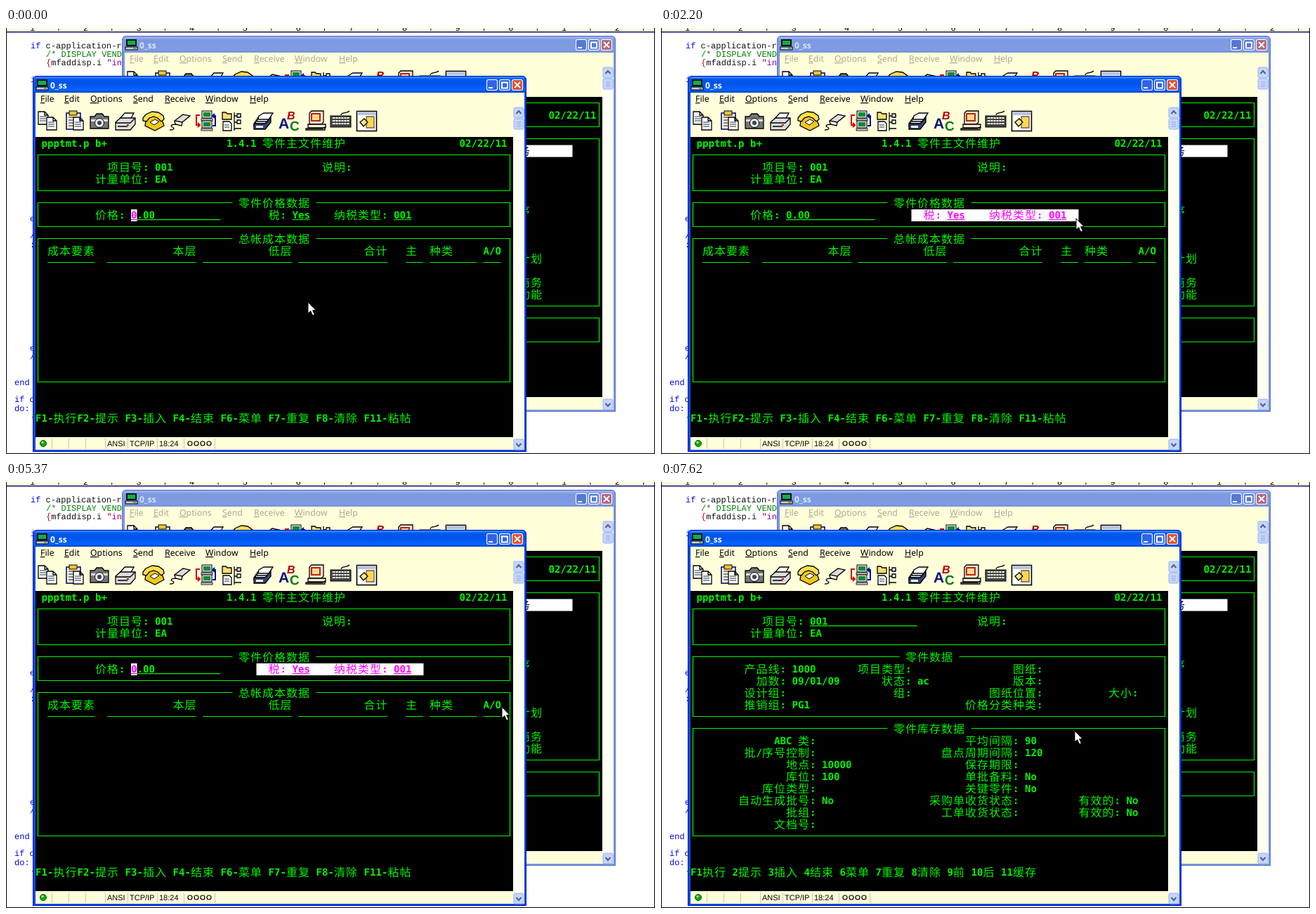
Recreate the animation shown at these times as an HTML page. Size 924x606 px, loop 8 s.

```html
<!DOCTYPE html>
<html lang="zh">
<head>
<meta charset="utf-8">
<title>Terminal session</title>
<style>
html, body { margin: 0; width: 100%; height: 100%; overflow: hidden; background: #fff; }
svg { display: block; width: 924px; height: 606px; }
text { white-space: pre; text-rendering: geometricPrecision; }
.mono { font: bold 14.12px "DejaVu Sans Mono", monospace; }
.cjk { font: 300 16px "Noto Sans CJK SC", "Noto Sans CJK", "Noto Sans CJK JP", sans-serif; letter-spacing: 1px; }
.code { font: 12px "Liberation Mono", monospace; }
.ui { font: 12.3px "Noto Sans", sans-serif; }
.small { font: 11px "Liberation Sans", sans-serif; }
.title { font: bold 12px "Noto Sans", sans-serif; }
</style>
</head>
<body>
<svg id="stage" viewBox="0 0 924 606" xmlns="http://www.w3.org/2000/svg"></svg>
<script>
const LOOP = 8000, CELL = 8.5, LEFT = 42, GREEN = '#00f400', CREAM = '#ffffda';
const colX = c => LEFT + CELL * c;
const rowY = r => 164 + 17 * r;

const rect = (x, y, w, h, fill, more = '') =>
  `<rect x="${x}" y="${y}" width="${w}" height="${h}" fill="${fill}" ${more}/>`;
const path = (d, fill = 'none', stroke = '#000', width = 1.3) =>
  `<path d="${d}" fill="${fill}" stroke="${stroke}" stroke-width="${width}"/>`;
const label = (x, y, s, cls, fill = '#000') =>
  `<text x="${x}" y="${y}" class="${cls}" fill="${fill}">${s}</text>`;

// Terminal text on the cell grid: wide characters take two cells
function term(row, ...items) {
  let out = '';
  for (let i = 0; i < items.length; i += 2) {
    let c = items[i];
    for (const run of items[i + 1].match(/[\u3000-\u9fff]+|[^\u3000-\u9fff]+/g)) {
      const wide = run.charCodeAt(0) >= 0x3000;
      out += `<text x="${colX(c)}" y="${rowY(row) + (wide ? 6 : 5)}" class="${wide ? 'cjk' : 'mono'}">${run}</text>`;
      c += run.length * (wide ? 2 : 1);
    }
  }
  return out;
}
const line = (c0, c1, y) => `<path d="M${colX(c0)} ${y}H${colX(c1) - .5}" stroke="currentColor" stroke-width="1.1"/>`;
const field = (c0, c1, row) => line(c0, c1, rowY(row) + 6.6);

function panel(r0, r1, c0 = 40, c1 = 40) {
  const y0 = rowY(r0) - .5, y1 = rowY(r1) - .5;
  return path(`M${colX(c1)} ${y0}H717.5V${y1}H45.5V${y0}H${colX(c0)}`, 'none', GREEN, 1.2);
}

const green = s => `<g fill="${GREEN}" color="${GREEN}">${s}</g>`;

function computer(x, y) {
  return rect(x, y, 14, 10, '#ddd', 'stroke="#000"') + rect(x + 2, y + 2, 10, 6, '#0a8a3a') +
    rect(x - 1, y + 11, 16, 3, '#ccc', 'stroke="#000" stroke-width=".8"');
}

function page(x, y) {
  return path(`M${x} ${y}h9l5 5v13h-14zM${x + 9} ${y}v5h5`, '#fff') +
    path(`M${x + 2} ${y + 7}h9m-9 3h9m-9 3h9`, 'none', '#234', 1);
}

function tools() {
  const keys = [0, 1, 2].map(r => path(`M464 ${128 + r * 4}h25`, 'none', '#ffe', 2)).join('');
  return page(46, 119) + page(58, 127) +
    // clipboard
    rect(86, 121, 20, 23, '#fff6c8', 'stroke="#00107c" stroke-width="1.6"') + rect(90, 118, 11, 6, '#f4c430', 'stroke="#000"') +
    path('M89 127h8m-8 4h8m-8 4h8m-8 4h8', 'none', '#00107c', 1) + page(96, 127) +
    // camera
    path('M120 126h6l3-4h8l3 4h6v17h-26z', '#777') + rect(121, 130, 24, 3, '#ddd') +
    '<circle cx="133" cy="135" r="6.5" fill="#eee" stroke="#000"/><circle cx="133" cy="135" r="3" fill="#345"/>' +
    // printer
    path('M162 129l7-8h13l-5 9z', '#fff') + path('M156 134l7-6h21v9l-7 8h-21z', '#ddd') +
    path('M156 135h21l7-7m-25 12h14', 'none') + rect(172, 137, 3, 2, '#d00') +
    // telephone
    path('M199 131l13-8 9 5 4 11-13 7-14-7z', '#f0c818') +
    path('M195 128l4-5 9-4 9 1 7 5 1 5-4 3-5-5-6-2-6 2-4 5-5-1z', '#ffe04c') +
    path('M205 134l7-4 6 3-7 5z', '#fff', '#000', 1) +
    // cable plug
    path('M240 132l12-9 10 2-11 9z', '#ddd') + path('M240 132l1 5 9 2 1-5M243 137c-9 0-9 3-6 4s3 4-4 4') +
    computer(279, 118) + computer(279, 132) + path('M276 124h-5v14h5m-3-3l3 3-3 3', 'none', '#d00', 2) +
    path('M294 139h4v-14h-4m3-3l-3 3 3 3', 'none', '#00109c', 2) +
    // folder tree
    path('M308 120h5l2 2h6v8h-13z', '#f8df74') + path('M309 133h9l3 3v10h-12z', '#fff') +
    path('M311 138h7m-7 3h7', 'none', '#234', 1) +
    path('M325 120v26m0-21h10m-10 9h9m-9 9h10') + path('M329 122h5v5h-5zm0 9h5v5h-5z', '#fff') +
    // card stack
    [0, 1, 2, 3].map(i => path(`M${354 + i * 2} ${134 - i * 3}l7-4h13l-6 9h-15z`, '#fff')).join('') +
    path('M353 136h16l8-9v7l-8 10h-16z', '#347') + rect(356, 139, 10, 3, '#fff') +
    // letters
    `<g font-family="Liberation Sans, sans-serif" font-weight="bold"><text x="388" y="143" font-size="21" fill="#00137f">A</text>` +
    `<text x="400" y="130" font-size="16" fill="#b00010" font-style="italic">B</text><text x="404" y="146" font-size="19" fill="#087a18">C</text></g>` +
    // desktop computer
    path('M432 121l3-3h17v16l-3 3h-17z', '#f4ecd0') + rect(435, 122, 12, 10, '#fd8', 'stroke="#b22" stroke-width="2"') +
    path('M430 137h25v5h-25zM427 143h24l3-2v4h-27z', '#f4ecd0') +
    // keyboard
    path('M477 124c0-5 8-2 12-6') + rect(462, 125, 29, 16, '#444', 'stroke="#000"') + keys +
    [0, 1, 2, 3, 4, 5, 6].map(i => path(`M${465 + i * 4} 126v12`, 'none', '#444', 1)).join('') +
    // settings
    rect(499.5, 118.5, 28, 28, '#fff', 'stroke="#000" stroke-width="1.6"') + rect(500, 119, 27, 5, '#b9c4da') +
    path('M513 126h11v16h-11z', '#f5d957', '#754') + path('M504 134l6-5 5 5-6 6z', '#ffe77a');
}

function scrollButton(y, arrow) {
  return rect(723, y, 14, 15, '#c6d5fb', 'rx="2" stroke="#9ab3ea"') +
    path(arrow ? `M726.5 ${y + 7.5 + arrow * -1.5}l3.5 ${arrow * 4} 3.5 ${-arrow * 4}` : `M727 ${y + 5}h6m-6 3h6m-6 3h6`, 'none', arrow ? '#4d6185' : '#8ca6e6', arrow ? 2 : 1);
}

// One emulator window; the rear one is the same window, shifted and inactive
function frame(active, screen) {
  const edge = active ? '#0b4be0' : '#7b95de';
  const rim = active ? '#0019c4' : '#5b74c8';
  const ink = active ? '#000' : '#aca899';
  const menus = [[49, 'File'], [83, 'Edit'], [120, 'Options'], [181, 'Send'], [226, 'Receive'], [284, 'Window'], [347, 'Help']];
  const seps = [65, 89, 113, 141, 173, 215, 253, 297];
  const button = (x, d, fill) => rect(x + .5, 73.5, 15, 15, fill, 'rx="2.5" stroke="#fff" stroke-width="1.1"') + path(d, 'none', '#fff', 2);
  const blue = active ? '#2f66e8' : '#5878d4', red = active ? '#df5230' : '#b5667a';
  return path('M38 603V75q0-7 7-7H734q7 0 7 7V603z', edge, 'none') +
    path('M38 92V75q0-7 7-7H734q7 0 7 7V92z', `url(#bar${active})`, 'none') +
    path('M38.5 602.5V75q0-6.5 6.5-6.5H734q6.5 0 6.5 6.5V602.5z', 'none', rim, 1) +
    rect(42, 92, 696, 508, CREAM) +
    rect(44, 73, 15, 10, '#111') + rect(46, 75, 11, 6, '#0bb04b') + rect(43, 84, 17, 4, '#ccc', 'stroke="#000"') + rect(54, 85.5, 4, 1, '#080') +
    label(63, 85.5, '0_ss', 'title', active ? '#fff' : '#d8e4f8') +
    button(684, 'M687 85h6', blue) + button(702, 'M706 77.5h8v8h-8z', blue) + button(720, 'M724 77l8 8m0-8l-8 8', red) +
    menus.map(([x, s]) => label(x, 105, `<tspan text-decoration="underline">${s[0]}</tspan>${s.slice(1)}`, 'ui', ink)).join('') +
    `<g>${tools()}</g>` +
    rect(42, 155, 680, 427, '#000') +
    rect(722, 112, 16, 488, '#fffff2') + scrollButton(113, -1) + scrollButton(129, 0) + scrollButton(585, 1) +
    seps.map(x => path(`M${x + .5} 584v15`, 'none', '#c9c8ae', 1)).join('') +
    '<circle cx="53" cy="591" r="4.5" fill="#13a813" stroke="#075c07"/><circle cx="52" cy="589.5" r="1.5" fill="#b4f7b4"/>' +
    label(144, 595, 'ANSI', 'small') + label(176, 595, 'TCP/IP', 'small') + label(218, 595, '18:24', 'small') +
    [262, 271, 280, 289].map(x => `<circle cx="${x}" cy="591" r="3" fill="none" stroke="#000" stroke-width="1.2"/>`).join('') +
    screen;
}

const rear = green(panel(0, 2) + panel(3, 17) + panel(18, 20) + term(1, 71, '02/22/11') +
  term(9, 66, '序') + term(13, 66, '计划') + term(15, 66, '商务') + term(16, 66, '功能')) +
  rect(560, 223.5, 119.5, 17, '#fff') + term(4, 66, '务');

const header = green(panel(1, 4) + term(0, 1, 'ppptmt.p b+', 32, '1.4.1 零件主文件维护', 71, '02/22/11') +
  term(2, 12, '项目号:', 20, '001', 48, '说明:') + term(3, 10, '计量单位:', 20, 'EA'));

const priceRow = term(6, 10, '价格:', 16, '0.00', 39, '税:', 43, 'Yes', 50, '纳税类型:', 60, '001') +
  field(16, 31, 6) + field(43, 46, 6) + field(60, 63, 6);

const price = green(panel(5, 7, 33, 47) + panel(8, 20, 33, 47) +
  term(5, 34, '零件价格数据') + priceRow + term(8, 34, '总帐成本数据') +
  term(9, 2, '成本要素', 23, '本层', 39, '低层', 55, '合计', 62, '主', 66, '种类', 75, 'A/O') +
  [[2, 10], [12, 27], [28, 43], [44, 59], [62, 65], [66, 74], [75, 78]].map(([a, b]) => line(a, b, rowY(10) - .5)).join('') +
  term(23, 0, 'F1-执行F2-提示 F3-插入 F4-结束 F6-菜单 F7-重复 F8-清除 F11-粘帖')) +
  `<g clip-path="url(#inverse)" fill="#f0f" color="#f0f">${rect(42, 258, 680, 17, '#fff')}${priceRow}</g>`;

const item = green(field(20, 38, 2) + panel(5, 10, 35, 45) + panel(11, 20, 33, 47) +
  term(5, 36, '零件数据') +
  term(6, 9, '产品线:', 17, '1000', 28, '项目类型:', 54, '图纸:') +
  term(7, 11, '加数:', 17, '09/01/09', 32, '状态:', 38, 'ac', 54, '版本:') +
  term(8, 9, '设计组:', 34, '组:', 50, '图纸位置:', 70, '大小:') +
  term(9, 9, '推销组:', 17, 'PG1', 46, '价格分类种类:') +
  term(11, 34, '零件库存数据') +
  term(12, 14, 'ABC 类:', 46, '平均间隔:', 56, '90') +
  term(13, 9, '批/序号控制:', 42, '盘点周期间隔:', 56, '120') +
  term(14, 16, '地点:', 22, '10000', 46, '保存期限:') +
  term(15, 16, '库位:', 22, '100', 46, '单批备料:', 56, 'No') +
  term(16, 12, '库位类型:', 46, '关键零件:', 56, 'No') +
  term(17, 8, '自动生成批号:', 22, 'No', 40, '采购单收货状态:', 65, '有效的:', 73, 'No') +
  term(18, 16, '批组:', 42, '工单收货状态:', 65, '有效的:', 73, 'No') +
  term(19, 14, '文档号:') +
  term(23, 0, 'F1执行 2提示 3插入 4结束 6菜单 7重复 8清除 9前 10后 11缓存'));

function editor() {
  let ruler = rect(0, 0, 924, 5, CREAM);
  for (let i = 1; i <= 12; i++) {
    const x = 37 + (i - 1) * 75.7;
    ruler += label(x - 3, 4, i % 10, 'code') + rect(x + 37.5, 1, 1, 3, '#000');
  }
  const ink = (s, fill) => `<tspan fill="${fill}">${s}</tspan>`;
  const lines = [[35, 29, 'if ' + ink('c-application-r', '#111')], [35, 77, 'i'], [35, 89, ':'], [34, 275, 'e'], [34, 299, '/'], [34, 312, ':'],
    [34, 459, 'e'], [34, 471, '/'], [12, 508, 'end'], [12, 532, 'if ' + ink('c', '#111')], [12, 545, 'do:'], [35, 557, '-'],
    [57, 41, ink('/* DISPLAY VEND', '#008000')], [57, 53, ink('{', '#e00000') + ink('mfaddisp.i ', '#111') + ink('"in', '#900090')]];
  return rect(0, 0, 924, 606, '#fff') + ruler + rect(0, 5, 924, 1.4, '#000080') +
    lines.map(([x, y, s]) => label(x, y, s, 'code', '#0000f0')).join('') +
    path('M.5 0V605.5H923.5V0', 'none', '#000', 1);
}

const bar = (n, stops) => `<linearGradient id="bar${n}" x2="0" y2="1">${stops.map(([o, c]) => `<stop offset="${o}" stop-color="${c}"/>`).join('')}</linearGradient>`;

document.getElementById('stage').innerHTML = `<defs>
  ${bar(1, [[0, '#0a48c8'], [.08, '#3a8cff'], [.2, '#0458ea'], [.5, '#0054ec'], [.85, '#0864fc'], [1, '#0040c4']])}
  ${bar(0, [[0, '#7088d4'], [.1, '#9db4ee'], [.25, '#7d99e0'], [.85, '#7f9de4'], [1, '#7590d8']])}
  <clipPath id="inverse"><rect id="caret" x="178" y="258" height="17"/><rect id="mark" x="${colX(37)}" y="258" height="17"/></clipPath>
  </defs>${editor()}
  <g transform="translate(127 -57)">${frame(0, rear)}</g>
  ${frame(1, header + `<g id="price">${price}</g><g id="item">${item}</g>`)}
  <g id="mouse">${path('M0 0V16L3.8 12.6 6.6 19 9.4 17.8 6.6 11.6H11.2Z', '#fff', '#000', 1)}</g>`;

const [caret, mark, priceScreen, itemScreen, mouse] =
  ['caret', 'mark', 'price', 'item', 'mouse'].map(id => document.getElementById(id));

// Pointer positions [time, x, y], each held until the next
const moves = [
  [0, 430, 390], [520, 428, 380], [620, 420, 350], [720, 405, 320], [820, 390, 296], [930, 378, 281], [1030, 371, 276],
  [1140, 362, 270], [1240, 357, 266], [1360, 402, 266], [1560, 425, 267], [1670, 462, 268], [1770, 505, 269],
  [1880, 548, 270], [1980, 584, 271], [2090, 598, 271], [2200, 591, 271], [2540, 590, 281], [2630, 590, 291],
  [3060, 591, 305], [3160, 600, 325], [3260, 620, 345], [3370, 642, 357], [3470, 657, 356], [3580, 690, 348],
  [3680, 740, 336], [3780, 800, 320], [3890, 803, 315], [4090, 803, 311], [5170, 727, 320], [5370, 706, 320],
  [5480, 660, 330], [5590, 610, 348], [5700, 580, 358], [6130, 578, 358], [6560, 579, 358], [6870, 580, 357], [7190, 589, 354]
];
// The caret starts lit and flips at each time
const blinks = [100, 620, 1360, 1680, 2200, 2540, 3060, 3580, 4090, 4630, 5480, 5700, 6560];
const DRAG = 1360, DROP = 2200, DESELECT = 6130, CLEAR = 7190, NEXT = 7530;

const pointer = t => moves.findLast(m => m[0] <= t);

function draw(t) {
  const [, x, y] = pointer(t);
  mouse.setAttribute('transform', `translate(${x} ${y})`);
  const lit = blinks.filter(b => b <= t).length % 2 === 0;
  caret.setAttribute('width', lit ? 8.5 : 0);
  const selected = t >= DRAG && t < DESELECT;
  const end = Math.round((pointer(Math.min(t, DROP))[1] - LEFT) / CELL);
  mark.setAttribute('width', selected ? (end - 37) * CELL : 0);
  priceScreen.setAttribute('visibility', t < CLEAR ? 'visible' : 'hidden');
  itemScreen.setAttribute('visibility', t >= NEXT ? 'visible' : 'hidden');
}

const start = performance.now();
function tick(now) {
  draw(Math.max(0, now - start) % LOOP);
  requestAnimationFrame(tick);
}
draw(0);
requestAnimationFrame(tick);
</script>
</body>
</html>
```
